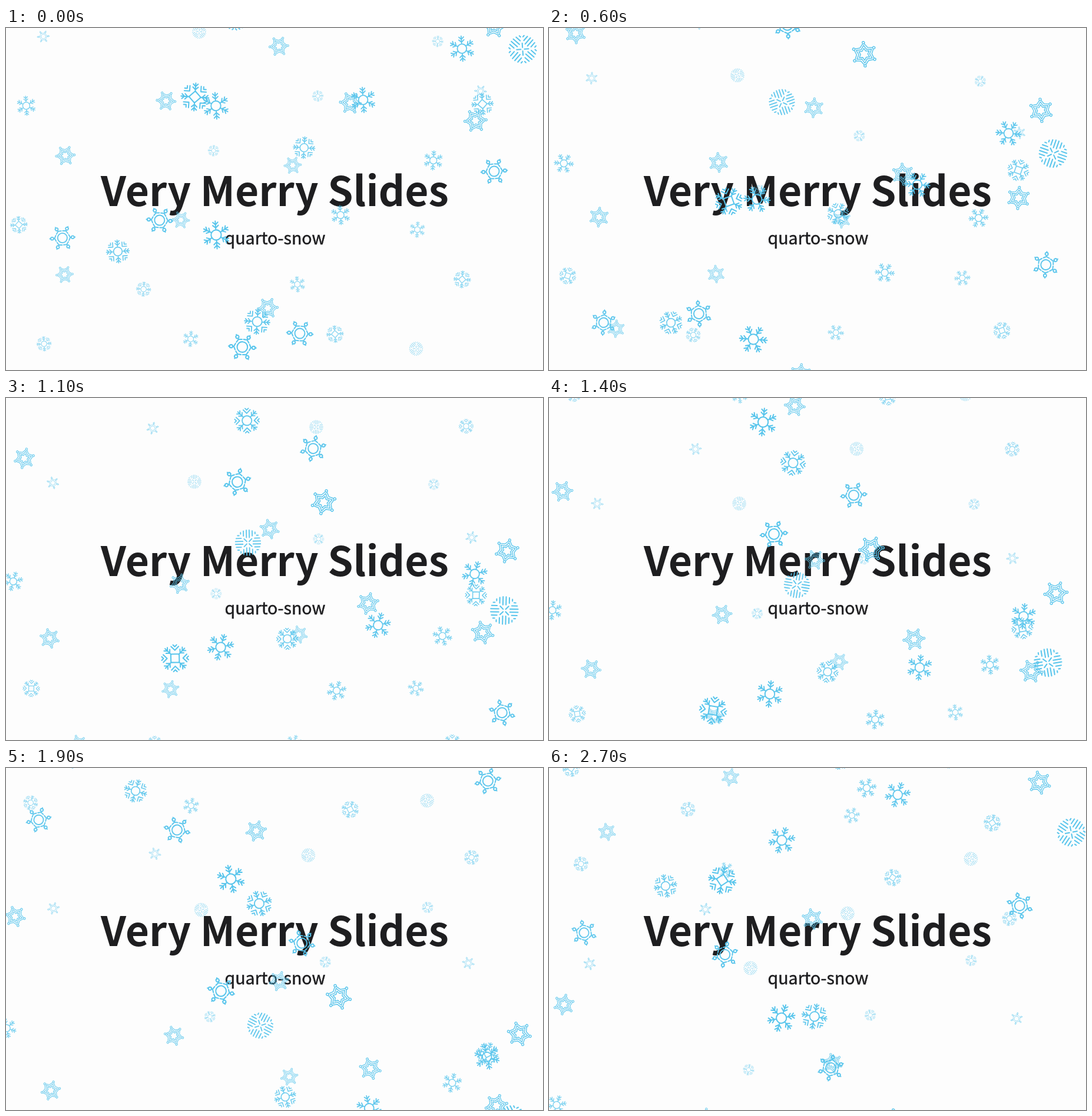
Animation of 912 by 580 pixels, one loop 2800 ms. Source, as an HTML page with a canvas:

```html
<!DOCTYPE html>
<html lang="en">
<head>
<meta charset="utf-8">
<title>Very Merry Slides</title>
<style>
  html, body { margin: 0; width: 912px; height: 580px; overflow: hidden; background: #fdfdfd; }
  svg, canvas { position: absolute; left: 0; top: 0; }
  text { font-family: "Noto Sans CJK JP", "Noto Sans CJK SC", "Noto Sans CJK", "Open Sans", sans-serif; fill: #1e1e20; text-anchor: middle; }
  .sub { stroke: #1e1e20; stroke-width: .5px; }
</style>
</head>
<body>
<svg width="912" height="580">
  <text x="456.5" y="302" font-size="69.4" font-weight="600">Very Merry Slides</text>
  <text class="sub" x="457" y="367" font-size="28.6">quarto-snow</text>
</svg>
<canvas id="snow" width="912" height="580"></canvas>
<script>
const WIDTH = 912, HEIGHT = 580, LOOP = 2800, STEP = 100, SWAY = 4000, TRAVEL = 723, TOP = -70;
const ctx = document.getElementById('snow').getContext('2d');

const ring = (r, y = 0) => `M${-r} ${y}a${r} ${r} 0 1 0 ${2 * r} 0a${r} ${r} 0 1 0 ${-2 * r} 0`;

// Repeats one upward-pointing arm n times around a centre piece of radius 100.
function rosette(n, start, arm, centre = '') {
  const shape = new Path2D(centre);
  for (let i = 0; i < n; i++) {
    shape.addPath(new Path2D(arm), new DOMMatrix().rotate(start + i * 360 / n));
  }
  return shape;
}

const branch = 'M0-38V-98M-17-92L0-74L17-92M-19-70L0-52L19-70M40-78V-40H78M58-76V-58H76';
const shapes = {
  hex: rosette(6, 30, ring(11, -80) + 'M0-69V-60M0-91V-98M-22-50L0-61L22-50', ring(37)),
  star: rosette(6, 30, ring(9, -86) + 'M-6-78L-28-49M6-78L28-49M-20-35L0-66L20-35M-13-23L0-44L13-23'),
  fern: rosette(6, 0, 'M0-36V-98M-18-90L0-72L18-90M-20-68L0-50L20-68', ring(36)),
  cross: rosette(4, 0, branch, ring(37)),
  square: rosette(4, 0, branch + 'M0-42L42 0'),
  disc: rosette(4, 45, 'M-11-40V-97M11-40V-97M-34-52V-91M34-52V-91M-56-68V-80M56-68V-80M9-9L30-30')
};

// Large flakes by size level: kind, middle x, start y, time of the leftmost point in steps.
const large = {
  22: [['square', 298, 117, 18], ['fern', 371, 351, 6], ['hex', 382, 541, 24], ['disc', 870, 36, 12]],
  21: [['hex', 277, 326, 5], ['hex', 822, 243, 28], ['hex', 499, 518, 30], ['fern', 375, 132, 4], ['star', 558, 609, 7]],
  20: [['hex', 75, 356, 22], ['disc', 411, -18, 1], ['fern', 610, 122, 31], ['cross', 430, 498, 9],
       ['fern', 796, 35, 1], ['star', 851, -4, 1]],
  19: [['star', 816, 157, 3]],
  18: [['star', 601, 127, 36], ['cross', 204, 379, 35]],
  17: [['cross', 491, 203, 16], ['star', 436, 475, 13], ['star', 34, 620, 20], ['square', 815, 129, 8]]
};

const flakes = [];
// Neighbours in the list turn in opposite directions.
const add = (level, kind, x, y, left) =>
  flakes.push({ level, kind, x, y, left, turn: flakes.length % 2 ? -1 : 1 });

for (const level of [22, 21, 20, 19, 18, 17]) {
  for (const [kind, x, y, left] of large[level]) add(level, kind, x, y, left * STEP);
}

// Small flakes are spread evenly over stage, size and sway.
const spread = (i, ratio) => (i * ratio) % 1;
const smallKinds = ['cross', 'fern', 'star', 'cross', 'fern', 'disc', 'star', 'hex', 'square'];
for (let i = 1; i <= 27; i++) {
  add(8 + i * 4 % 9, smallKinds[i % smallKinds.length],
    WIDTH * spread(i, 0.7549), TOP + TRAVEL * spread(i, 0.5698), SWAY * spread(i, 0.618));
}

function draw(t) {
  ctx.clearRect(0, 0, WIDTH, HEIGHT);
  ctx.strokeStyle = '#58c5ec';
  ctx.lineCap = ctx.lineJoin = 'round';
  const spin = (4 + t * 0.036) * Math.PI / 180;
  for (const f of flakes) {
    const radius = 1.5 + 1.02 * f.level;
    const fallTime = 8700 - 284 * f.level;
    const y = (f.y - TOP + TRAVEL * t / fallTime) % TRAVEL + TOP;
    const x = f.x - radius * Math.cos(2 * Math.PI * (t - f.left) / SWAY);
    ctx.save();
    ctx.translate(x, y);
    ctx.rotate(f.turn * spin);
    ctx.scale(radius / 100, radius / 100);
    ctx.globalAlpha = 0.55 + 0.45 * (f.level - 8) / 14;
    ctx.lineWidth = f.kind === 'star' ? 6.5 : 8.5;
    ctx.stroke(shapes[f.kind]);
    ctx.restore();
  }
}

const begin = performance.now();
function tick() {
  const t = (performance.now() - begin) % LOOP;
  draw(Math.floor(t / STEP) * STEP);
  requestAnimationFrame(tick);
}
tick();
</script>
</body>
</html>
```
